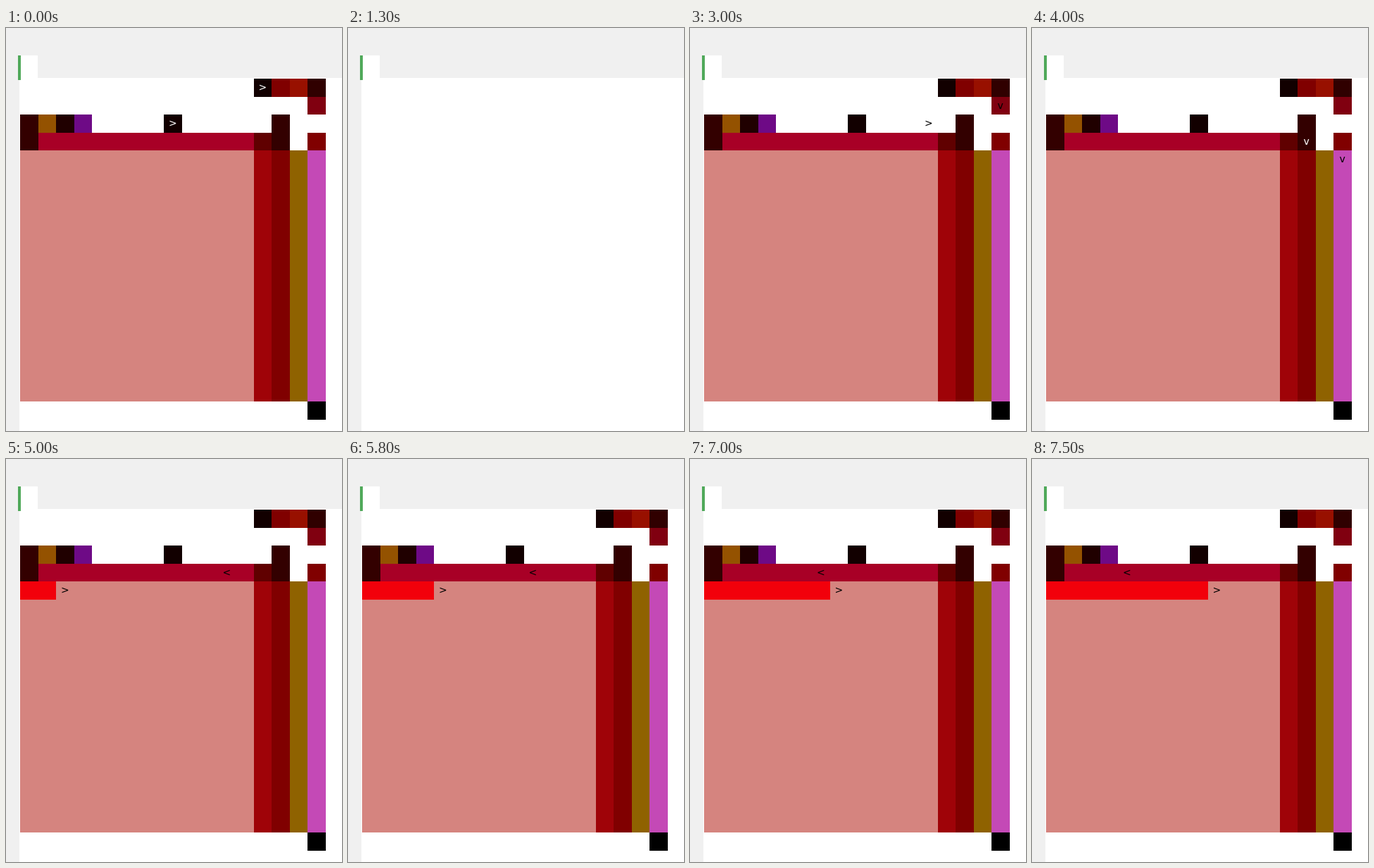
Write an HTML page that moves like this. It is 477 px wide and 573 px high and loops after 8 s.

```html
<!DOCTYPE html>
<html lang="en">
<head>
<meta charset="utf-8">
<title>Grid walkers</title>
<style>
html, body { margin: 0; width: 100%; height: 100%; overflow: hidden; background: #fff; }
svg { display: block; width: 477px; height: 573px; }
text { font: 14px "DejaVu Sans", sans-serif; text-anchor: middle; }
</style>
</head>
<body>
<svg id="stage" viewBox="0 0 477 573" xmlns="http://www.w3.org/2000/svg">
  <rect width="477" height="573" fill="#fff"/>
  <path d="M0 0H477V71H19V573H0Z" fill="#f0f0f0"/>
  <rect x="21" y="39" width="24" height="33" fill="#fff"/>
  <rect x="17" y="39" width="4" height="35" fill="#50a95a"/>
  <g id="board" shape-rendering="crispEdges"></g>
</svg>
<script>
const LOOP = 8000, CELL = 25.5;
const BLANK_FROM = 1300, BLANK_TO = 1900;
const STEPS = [0, 1900, 2400, 2600, 3000, 3500, 3800, 4000, 4500,
  4900, 5000, 5400, 5800, 6100, 6500, 7000, 7200, 7500];

// column, row, columns wide, rows high, colour
const BLOCKS = [
  [13, 0, 1, 1, "#120000"], [14, 0, 1, 1, "#800000"],
  [15, 0, 1, 1, "#981000"], [16, 0, 1, 1, "#300000"],
  [16, 1, 1, 1, "#800010"],
  [0, 2, 1, 2, "#330000"], [1, 2, 1, 1, "#945200"],
  [2, 2, 1, 1, "#200000"], [3, 2, 1, 1, "#6e0a86"],
  [8, 2, 1, 1, "#120000"], [14, 2, 1, 2, "#330000"],
  [1, 3, 12, 1, "#a80026"], [13, 3, 1, 1, "#600000"],
  [16, 3, 1, 1, "#800000"],
  [0, 4, 13, 14, "#d5847f"], [13, 4, 1, 14, "#9f0308"],
  [14, 4, 1, 14, "#800000"], [15, 4, 1, 14, "#8f6200"],
  [16, 4, 1, 14, "#c449b6"], [16, 18, 1, 1, "#000000"]
];

const board = document.getElementById("board");
const colX = c => Math.round(20 + c * CELL);
const rowY = r => Math.round(72 + r * CELL);

function add(tag, attrs) {
  const el = document.createElementNS("http://www.w3.org/2000/svg", tag);
  set(el, attrs);
  board.appendChild(el);
  return el;
}

function set(el, attrs) {
  for (const name in attrs) el.setAttribute(name, attrs[name]);
}

function box(c, r, w, h, fill) {
  return add("rect", {
    x: colX(c), y: rowY(r), fill,
    width: colX(c + w) - colX(c), height: rowY(r + h) - rowY(r)
  });
}

function firstWalker(k) {
  if (k < 4) return [13 + k, 0, ">"];
  if (k < 8) return [16, k - 3, "v"];
  return [k - 8, 4, ">"];
}

function secondWalker(k) {
  if (k < 7) return [8 + k, 2, ">"];
  if (k === 7) return [14, 3, "v"];
  return [21 - k, 3, "<"];
}

// White ink on the very dark cells, black elsewhere
function inkAt(c, r) {
  const block = BLOCKS.find(([x, y, w, h]) => c >= x && c < x + w && r >= y && r < y + h);
  if (!block) return "#000";
  const rgb = parseInt(block[4].slice(1), 16);
  return (rgb >> 16) + (rgb >> 8 & 255) + (rgb & 255) < 112 ? "#fff" : "#000";
}

function place(el, [c, r, glyph]) {
  set(el, { x: 20 + (c + 0.5) * CELL, y: rowY(r) + 17, fill: inkAt(c, r) });
  el.textContent = glyph;
}

BLOCKS.forEach(b => box(...b));
const trail = box(0, 4, 0, 1, "#f2000b");
const first = add("text", {}), second = add("text", {});

function draw(t) {
  const blank = t >= BLANK_FROM && t < BLANK_TO;
  board.setAttribute("display", blank ? "none" : "inline");
  const k = STEPS.filter(s => s <= t).length - 1;
  trail.setAttribute("width", colX(Math.max(0, k - 8)) - colX(0));
  place(first, firstWalker(k));
  place(second, secondWalker(k));
}

const start = performance.now();
function tick() {
  draw((performance.now() - start) % LOOP);
  requestAnimationFrame(tick);
}
tick();
</script>
</body>
</html>
```
